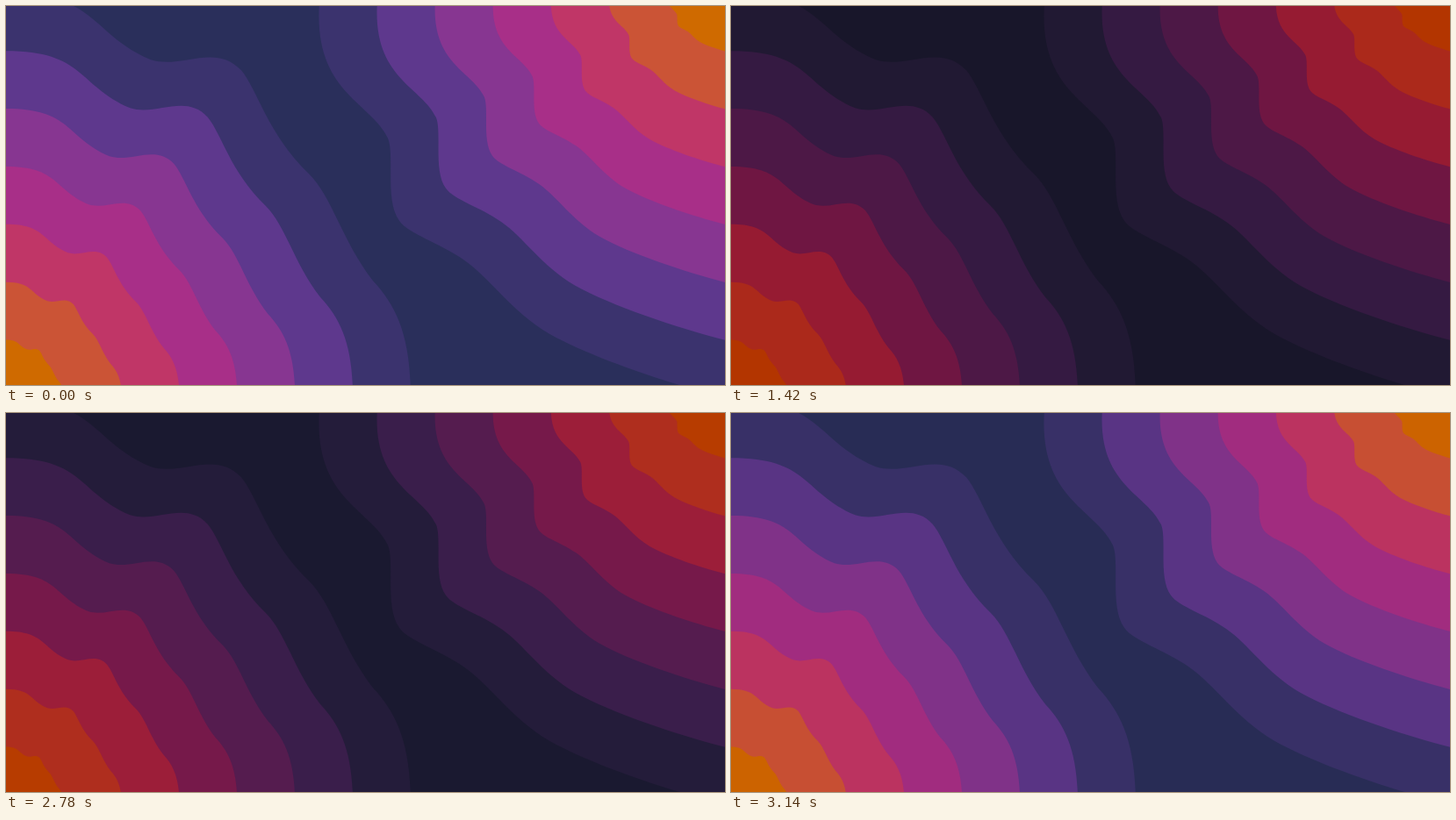
Animation, 819 px wide and 432 px high, one loop 3.2 s. Source, as an HTML page with a canvas:

```html
<!DOCTYPE html>
<html lang="en">
<head>
<meta charset="utf-8">
<title>Layered corners</title>
<style>
html, body { margin: 0; width: 100%; height: 100%; overflow: hidden; background: #2a2f5b; }
canvas { display: block; }
</style>
</head>
<body>
<canvas id="stage" width="819" height="432"></canvas>
<script>
const ctx = document.getElementById('stage').getContext('2d');
const W = 819, H = 432, LOOP = 3200, STEP = 120;
const LAYERS = 7;

// The 16:9 artwork fills the width, so a strip is cut off above and below
const CROP = (W * 9 / 16 - H) / 2;

// Background first, then layers from the largest to the smallest
const bright = ['#2a2f5b', '#3b336e', '#5e388d', '#873691', '#a82f88', '#c03667', '#cb5436', '#cf6a00'].map(rgb);
const dark = ['#13101e', '#1a1224', '#2b132f', '#3f1133', '#611030', '#8c1425', '#a31e14', '#ac2800'].map(rgb);

// One wavy quarter disc per corner, measured from the corner inwards
const corners = [
  { x: 0, y: H + CROP, dx: 1, dy: -1, shape: new Path2D(
    'M0 461 C105 461 95 415 165 385 C200 374 238 405 268 373 ' +
    'C287 350 297 302 345 255 C372 228 382 180 418 133 C445 104 461 70 461 0 L0 0Z') },
  { x: W, y: -CROP, dx: -1, dy: 1, shape: new Path2D(
    'M461 0 C474 112 404 122 384 165 C376 184 388 236 371 259 ' +
    'C361 274 325 284 297 304 C268 324 244 362 200 388 C150 416 65 444 0 461 L0 0Z') }
];

function rgb(hex) {
  return [1, 3, 5].map(i => parseInt(hex.slice(i, i + 2), 16));
}

function mix(a, b, t) {
  return `rgb(${a.map((v, i) => Math.round(v + (b[i] - v) * t)).join()})`;
}

// Share of the dark palette, changing in five hard steps each way
function darkness(t) {
  const stepAt = start => Math.min(4, Math.floor((t - start) / STEP));
  if (t < 1060) return 0;
  if (t < 2660) return (stepAt(1060) + 1) / 5;
  return 0.9 - stepAt(2660) / 5;
}

function drawCorner(corner, size) {
  ctx.save();
  ctx.translate(corner.x, corner.y);
  ctx.scale(corner.dx * size, corner.dy * size);
  ctx.fill(corner.shape);
  ctx.restore();
}

function draw(t) {
  const amount = darkness(t);
  const shade = i => mix(bright[i], dark[i], amount);
  ctx.fillStyle = shade(0);
  ctx.fillRect(0, 0, W, H);
  for (let i = 1; i <= LAYERS; i++) {
    ctx.fillStyle = shade(i);
    corners.forEach(corner => drawCorner(corner, (LAYERS + 1 - i) / LAYERS));
  }
}

const origin = performance.now();
function tick() {
  draw((performance.now() - origin) % LOOP);
  requestAnimationFrame(tick);
}
tick();
</script>
</body>
</html>
```
